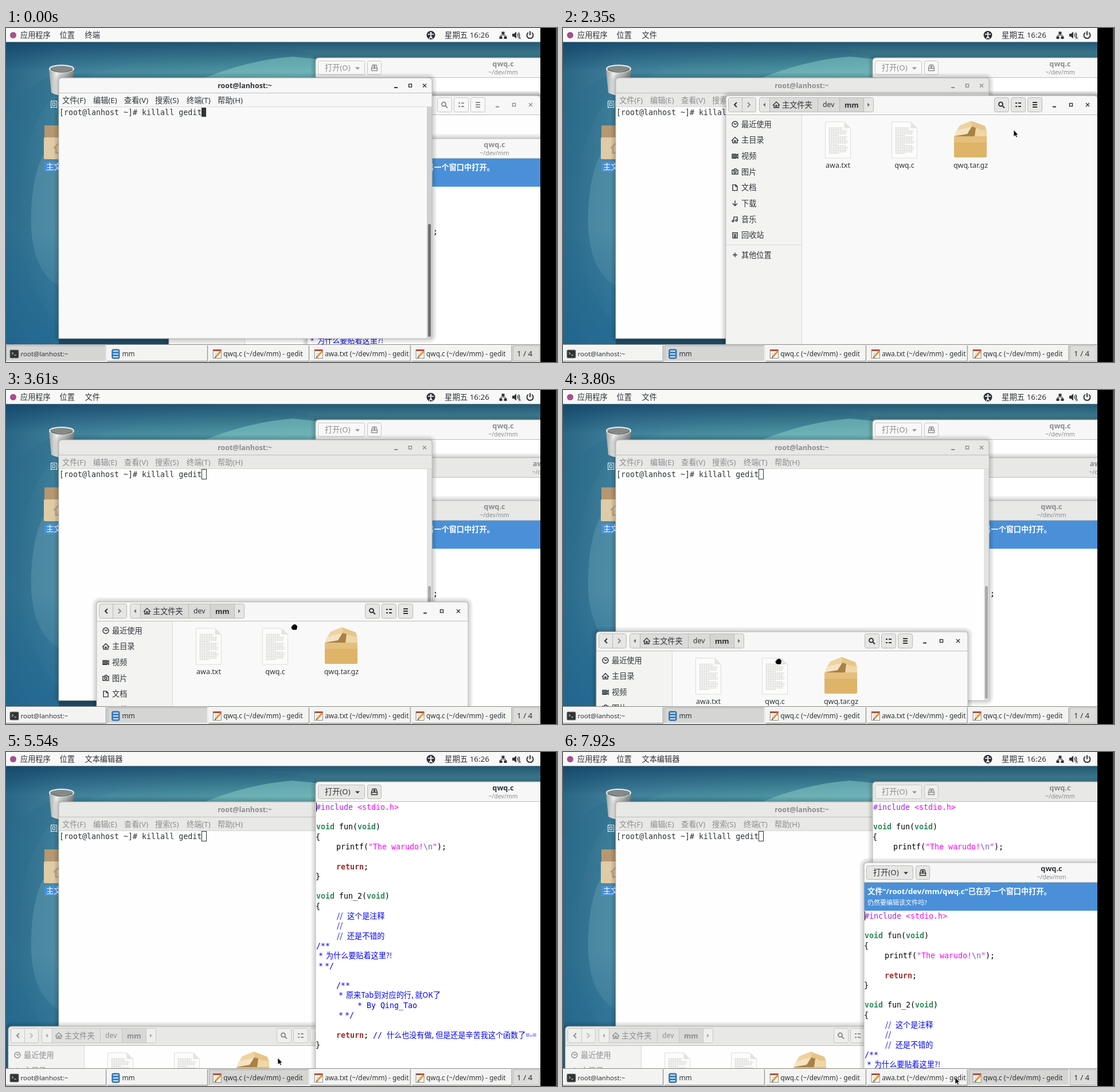
These frames come from a looping animation (961 px wide and 583 px high, 8 s). An HTML page:

```html
<!DOCTYPE html>
<html lang="zh-CN">
<head>
<meta charset="utf-8">
<title>Desktop session</title>
<style>
html, body { margin: 0; width: 100%; height: 100%; overflow: hidden; background: #000; }
svg { display: block; }
text { font-family: "Noto Sans", "Noto Sans CJK SC", "Noto Sans CJK", sans-serif; white-space: pre; }
.mono { font-family: "DejaVu Sans Mono", "Noto Sans CJK SC", monospace; }
.cjk { font-family: "Noto Sans CJK SC", "Noto Sans CJK JP", "Noto Sans CJK", sans-serif; }
.bold { font-weight: 700; }
.mid { text-anchor: middle; }
.line { fill: none; stroke: currentColor; stroke-width: 1.4; }
.win { --head: #e8e8e6; --ink: #8b8e8f; --btn: #efefed; --edge: #c6c6c3; --down: #d8d8d6; --thumb: #a8aaa8; --trough: #e3e3e1; --paper: #fefefe; color: var(--ink); }
.win.pale { --head: #f7f7f7; --btn: #f8f8f8; }
.win.on { --head: #f7f7f7; --ink: #2e3436; --btn: #e6e6e4; --edge: #b8b8b5; --down: #d4d4d1; --thumb: #6e7273; --trough: #d0d0ce; --paper: #f9f9f9; }
.head { fill: var(--head); }
.btn { fill: var(--btn); stroke: var(--edge); }
.ink { fill: var(--ink); }
.on .hollow, .win:not(.on) .solid { display: none; }
.task { --lit: #fff; --shade: #868683; fill: #f3f3f2; }
.task.on { --lit: #a4a4a1; --shade: #f4f4f3; fill: #d5d5d3; }
</style>
</head>
<body>
<script>
const rect = (x, y, w, h, attrs = '') => `<rect x="${x}" y="${y}" width="${w}" height="${h}" ${attrs}/>`;
const path = (d, attrs = 'class="line"') => `<path d="${d}" ${attrs}/>`;
const group = (x, y, body, attrs = '') => `<g transform="translate(${x} ${y})" ${attrs}>${body}</g>`;
const fill = c => `fill="${c}"`;
// y is the middle of the line
const text = (x, y, s, size = 13.2, attrs = 'class="ink"') =>
  `<text x="${x}" y="${y + size * .36}" font-size="${size}" ${attrs}>${s.replace(/</g, '&lt;')}</text>`;
const button = (x, y, w, h, body = '') => rect(x + .5, y + .5, w - 1, h - 1, 'rx="3" class="btn"') + body;

const controls = (xs, y) =>
  path(`M${xs[0] - 3} ${y + 3.5}h6`, 'class="line" style="stroke-width:2"') +
  rect(xs[1] - 2.5, y - 2.5, 5, 5, 'class="line"') +
  path(`M${xs[2] - 3} ${y - 3}l6 6m0-6l-6 6`);

function win(id, w, h, headH, body) {
  let shadow = '';
  for (let i = 1; i < 5; i++)
    shadow += rect(-2 * i, -2 * i, w + 4 * i, h + 4 * i, `rx="${6 + 2 * i}" fill="#000" opacity=".045"`);
  const top = `M0 ${headH}V6Q0 0 6 0H${w - 6}Q${w} 0 ${w} 6V${headH}`;
  return `<g id="${id}" class="win">${shadow}${rect(0, headH, w, h - headH, 'style="fill:var(--paper)"')}` +
    path(top + 'Z', 'class="head"') + path(top, 'fill="none" stroke="#b2b2af"') +
    body + path(`M0 ${headH - .5}H${w}M0 ${headH}V${h}H${w}V${headH}`, 'fill="none" stroke="#bdbdba"') + '</g>';
}

// terminal
const menus = [['文件(F)', 6], ['编辑(E)', 60], ['查看(V)', 114], ['搜索(S)', 168], ['终端(T)', 223], ['帮助(H)', 277]];
const terminal = win('term', 651, 455, 27,
  text(324.5, 13.5, 'root@lanhost:~', 12.4, 'class="ink bold mid"') + controls([588, 613, 638], 13.5) +
  rect(.5, 27, 650, 24, 'class="head"') + menus.map(([s, x]) => text(x, 39, s)).join('') +
  path('M0 50.5H651', 'stroke="#d6d6d3"') +
  text(1, 60, '[root@lanhost ~]# killall gedit', 13.3, 'class="mono" fill="#2e3436"') +
  rect(249, 52, 8, 16, 'class="solid" fill="#2e3436"') +
  rect(249.5, 51.5, 8, 17, 'class="hollow" fill="none" stroke="#2e3436"') +
  rect(642, 51, 9, 403, 'style="fill:var(--trough)"') + rect(644, 255, 5, 197, 'rx="2.5" style="fill:var(--thumb)"'));

// file manager
const house = 'M-6 1L0-5L6 1M-4 0V5H-1V1H1V5H4V0';
const places = [
  ['最近使用', 'M5 0A5 5 0 1 1-5 0A5 5 0 1 1 5 0M-2-2L0 0L3-1'], ['主目录', house],
  ['视频', 'M-5-3H2V4H-5ZM2 0L5-3V4L2 1M-4-1H1M-4 1H1M-4 3H1'],
  ['图片', 'M-5-3H-2L-1-5H2L3-3H5V4H-5ZM2 0A2 2 0 1 1-2 0A2 2 0 1 1 2 0'],
  ['文档', 'M-4-5H1L4-2V5H-4ZM1-5V-2H4'], ['下载', 'M0-5V4M-4 0L0 4L4 0'],
  ['音乐', 'M-2 3V-4H4V2M-2 3A1.5 1.5 0 1 1-5 3A1.5 1.5 0 1 1-2 3M4 2A1.5 1.5 0 1 1 1 2A1.5 1.5 0 1 1 4 2'],
  ['回收站', 'M-5-4H5M-4-4V5H4V-4M-2-1H2M-2 1H2M-2 3H2'], ['其他位置', 'M-4 0H4M0-4V4']];
let sheet = path('M0 0H33L44 11V63H0Z', 'fill="#fcfcfb" stroke="#dcdcda"') + path('M33 0V11H44Z', fill('#e3e3e0'));
for (let i = 0; i < 18; i++)
  sheet += path(`M6 ${10.5 + i * 2.6}h${i % 6 == 5 ? 17 : i < 2 ? 24 : 30 + i * 7 % 4}`, 'stroke="#c3c3c0" stroke-dasharray="3 .8"');
const box = path('M0 27H57V62Q57 64 55 64H2Q0 64 0 62Z', fill('#deb469')) + path('M0 27H57V38H0Z', fill('#e5bf7c')) +
  path('M2 27L8 15L29 9L50 15L55 27Z', fill('#a98046')) +
  path('M4 18L10 8L30 0L31 10Z', fill('#eed3a1')) + path('M30 0L54 9L57 18L31 10Z', fill('#e6c58a')) +
  path('M0 27L4 17L31 10L23 23Z', fill('#f5e3c3')) + path('M57 27L57 18L38 12L36 27Z', fill('#efd6a6'));
const arrow = (x, y, d) => path(`M${x - 2 * d} ${y - 4}L${x + 2 * d} ${y}L${x - 2 * d} ${y + 4}`, `class="line" style="stroke-width:2" opacity="${d < 0 ? 1 : .5}"`);
const caret = (x, d) => path(`M${x - 2 * d} 12.5l${4 * d} 3.5l${-4 * d} 3.5Z`, 'class="ink" opacity=".65"');
const files = win('files', 648, 470, 34,
  button(4, 3, 49, 26, path('M28.5 4V28', 'style="stroke:var(--edge)"')) + arrow(17, 16, -1) + arrow(40, 16, 1) +
  button(58, 3, 200, 26) + rect(76, 4, 122, 24, 'style="fill:var(--down)" opacity=".55"') +
  rect(198, 4, 42, 24, 'style="fill:var(--down)"') +
  path('M76.5 4V28M160.5 4V28M198.5 4V28M240.5 4V28', 'style="stroke:var(--edge)"') +
  caret(67, -1) + caret(249, 1) + group(88, 16, path(house)) +
  text(98, 16, '主文件夹') + text(169, 16, 'dev', 12.2) + text(207, 16, 'mm', 12.6, 'class="ink bold"') +
  button(468, 3, 26, 26) + button(497, 3, 26, 26) + button(526, 3, 26, 26) +
  path('M483 15A3.5 3.5 0 1 1 476 15A3.5 3.5 0 1 1 483 15M482 17.5L486 21.5', 'class="line" style="stroke-width:2"') +
  path('M505 13H508M510 13H515M505 19H508M510 19H515M535 12H543M535 16H543M535 20H543', 'class="line" style="stroke-width:2"') +
  controls([573, 602, 631], 16) +
  rect(.5, 34, 131.5, 436, fill('#f3f3f2')) + path('M132.5 34V470M0 260.5H132', 'stroke="#d9d9d6"') +
  places.map(([name, icon], i) => {
    const y = i < 8 ? 50 + i * 27.65 : 278;
    return group(16, y, path(icon)) + text(27, y, name);
  }).join('') +
  group(173.5, 46, sheet) + group(289.5, 46, sheet) + group(398, 44, box) +
  [['awa.txt', 195.5], ['qwq.c', 311.5], ['qwq.tar.gz', 427]]
    .map(([s, x]) => text(x, 121.5, s, 12.5, 'class="ink mid"')).join(''));

// text editor
const styles = {
  n: ['#000', 'mono'], p: ['#a020f0', 'mono'], s: ['#f0f', 'mono'], e: ['#6a5acd', 'mono'],
  k: ['#2e8b57', 'mono bold'], r: ['#a52a2a', 'mono bold'], c: ['#00f', 'mono'], j: ['#00f', 'cjk']
};
const source = [
  [0, 1, 'p', '#include'], [0, 73, 's', '<stdio.h>'],
  [2, 1, 'k', 'void'], [2, 41, 'n', 'fun('], [2, 73, 'k', 'void'], [2, 105, 'n', ')'], [3, 0, 'n', '{'],
  [4, 36, 'n', 'printf('], [4, 92, 's', '"The warudo!'], [4, 188, 'e', '\\n'], [4, 204, 's', '"'], [4, 212, 'n', ');'],
  [6, 36, 'r', 'return'], [6, 84, 'n', ';'], [7, 0, 'n', '}'],
  [9, 1, 'k', 'void'], [9, 41, 'n', 'fun_2('], [9, 89, 'k', 'void'], [9, 121, 'n', ')'], [10, 0, 'n', '{'],
  [11, 37, 'j', '//'], [11, 55, 'j', '这个是注释'], [12, 37, 'j', '//'], [13, 37, 'j', '//'], [13, 55, 'j', '还是不错的'],
  [14, 1, 'c', '/**'], [15, 5, 'c', '*'], [15, 18, 'j', '为什么要贴着这里?!'], [16, 5, 'c', '*'], [16, 16, 'c', '*/'],
  [18, 36, 'c', '/**'], [19, 40, 'c', '*'], [19, 53, 'j', '原来Tab到对应的行, 就OK了'],
  [20, 73, 'c', '*'], [20, 89, 'c', 'By Qing_Tao'], [21, 40, 'c', '*'], [21, 51, 'c', '*/'],
  [23, 36, 'r', 'return'], [23, 84, 'n', ';'], [23, 100, 'c', '//'],
  [23, 124, 'j', '什么也没有做, 但是还是辛苦我这个函数了=-='], [24, 0, 'n', '}']];
const listing = source.map(([row, x, kind, s]) => {
  const [color, cls] = styles[kind];
  return text(x, 44 + row * 17.3, s, kind == 'j' ? 13.1 : 13.3, `class="${cls}" fill="${color}"`);
}).join('');
const notice = rect(0, 35, 654, 49, fill('#4a90d9')) +
  text(6, 50.5, '文件“/root/dev/mm/qwq.c”已在另一个窗口中打开。', 13.2, 'class="bold" fill="#fff"') +
  text(6, 70, '仍然要编辑该文件吗?', 11, fill('#fff'));
const editor = (id, title, info, lines) => win(id, 654, 520, 35,
  rect(0, 35, 654, 485, fill('#fff')) +
  button(4, 5, 82, 25) + text(16, 17.5, '打开(O)') + path('M69 16.5h8l-4 4Z', 'class="ink"') +
  button(90, 5, 25, 25) + path('M97.5 22.5V18L99.5 12.5H105.5L107.5 18V22.5ZM97 18.5H108M102.5 13V17M100.5 15L102.5 17L104.5 15') +
  text(327, 10.5, title, 12.8, 'class="ink bold mid"') + text(327, 25.5, '~/dev/mm', 10.6, 'class="mid" fill="#8b8e8f"') +
  info + group(0, info ? 49 : 0, lines + rect(1, 36, 1, 16, 'class="caret" fill="#000"')));

// desktop
const stops = list => list.map(([at, c, a = 1]) => `<stop offset="${at}" stop-color="${c}" stop-opacity="${a}"/>`).join('');
const desktop = `<defs>
  <linearGradient id="sea">${stops([[0, '#2d6a89'], [.1, '#4486a0'], [.35, '#559ba8'], [.56, '#66b0b3']])}</linearGradient>
  <linearGradient id="dusk" x2="0" y2="1">${stops([[.04, '#0f4064', .8], [.13, '#0f4064', .1], [.6, '#1c6390', .1], [1, '#1c6390', .8]])}</linearGradient>
  <linearGradient id="steel">${stops([[0, '#9fa3a2'], [.3, '#eceeed'], [.65, '#bcc0bf'], [1, '#7a7e7d']])}</linearGradient></defs>` +
  rect(0, 0, 961, 583, fill('url(#sea)')) +
  path('M0 150Q45 90 92 80V110Q30 170 22 300T92 520V552H60Q0 440 0 330Z', fill('#2f708f') + ' opacity=".4"') +
  path('M92 190Q48 220 44 320T92 450Z', fill('#6aa3b3') + ' opacity=".45"') +
  path('M130 90Q260 40 400 34Q500 36 541 45V90Z', fill('#4d98a6') + ' opacity=".5"') +
  rect(0, 0, 961, 583, fill('url(#dusk)')) +
  path('M340 90Q420 56 500 50L541 54V90Z', fill('#84c8c5') + ' opacity=".55"') +
  path('M92 535H284V553H92Z', fill('#1d4a68')) +
  path('M75 71L79 113Q97 122 115 113L119 71Z', fill('url(#steel)')) +
  '<ellipse cx="97" cy="71" rx="21" ry="6" fill="#858988" stroke="#eceeed" stroke-width="2"/>' +
  path('M78 73Q97 81 116 73', 'fill="none" stroke="#5f6362" stroke-width="1.5"') +
  text(77, 133, '回收站', 13.2, fill('#fff')) +
  path('M67 170H92L98 178H124V228H67Z', fill('#b5986f')) + rect(66, 191, 60, 38, 'rx="2" fill="#e0cba8"') +
  path('M83 210L96 198L109 210M87 208V218H105V208', 'fill="none" stroke="#bfa57c" stroke-width="3"') +
  rect(67, 234, 58, 17, fill('#4a90d9')) + text(70, 242.5, '主文件夹', 13.2, fill('#fff'));

// panels
const dark = '#2e3436';
const topBar = rect(0, 0, 932, 24.5, fill('#f8f8f7')) + rect(0, 24, 932, 1, fill('#8d9293')) +
  '<circle cx="12.5" cy="12.5" r="5.5" fill="#a3508f"/>' +
  text(25, 12, '应用程序', 13.2, fill(dark)) + text(93.5, 12, '位置', 13.2, fill(dark)) +
  text(137.5, 12, '', 13.2, `id="app" fill="${dark}"`) +
  text(765, 12, '星期五 16:26', 13.4, `fill="${dark}" font-weight="500"`) +
  group(741, 12.5, `<circle r="7.5" fill="${dark}"/><circle cy="-4" r="1.5" fill="#fff"/>` +
    path('M-5-1.5H5M0-1V2L-2.5 6M0 2L2.5 6', 'fill="none" stroke="#fff" stroke-width="1.6"')) +
  group(867, 12.5, path('M-2.5-6H2.5V-1.5H-2.5ZM-6.5 2H-1.5V6.5H-6.5ZM1.5 2H6.5V6.5H1.5Z', fill(dark)) +
    path('M0-2V0M-4 2V0H4V2', `fill="none" stroke="${dark}"`)) +
  group(890, 12.5, path('M-7-2.5H-4L0-6V6L-4 2.5H-7Z', fill(dark)) +
    path('M2-2.5Q4 0 2 2.5M4-4.5Q7.5 0 4 4.5', `fill="none" stroke="${dark}" stroke-width="1.5"`) + path('M4 3l4 4m0-4l-4 4', `stroke="${dark}"`)) +
  group(914, 12.5, path('M-3-4.5A5.5 5.5 0 1 0 3-4.5M0-7V0', `fill="none" stroke="${dark}" stroke-width="2"`));

const icons = {
  term: rect(0, 0, 15, 14, 'rx="1.5" fill="#2f3334" stroke="#777"') + path('M3 4l3 2l-3 2M7 9h4', 'fill="none" stroke="#ddd"'),
  files: rect(1, -1, 13, 16, 'rx="2" fill="#3c7fc0" stroke="#235e96"') + path('M3 2H12M3 7H12M3 12H12', 'stroke="#cfe2f4" stroke-width="2"'),
  note: rect(.5, -.5, 14, 15, 'fill="#fbfbfa" stroke="#888"') + rect(.5, -1, 14, 3, fill('#b54c3b')) +
    path('M3 6H11M3 9H9', 'stroke="#bbb"') + path('M5 12L14 2', 'stroke="#e8932f" stroke-width="3"') + path('M3 14l1-3l2 2Z', fill('#444'))
};
const tasks = [['term', 'root@lanhost:~', 11.5], ['files', 'mm', 12], ['src', 'qwq.c (~/dev/mm) - gedit'], ['awa', 'awa.txt (~/dev/mm) - gedit'], ['copy', 'qwq.c (~/dev/mm) - gedit']];
const taskBar = rect(0, 552, 932, 31, fill('#e9e9e7')) + rect(0, 552, 932, 1, fill('#8f8f8c')) +
  tasks.map(([id, label, size = 11.8], i) => group(i * 176.9, 554,
    rect(0, 0, 175, 28) + path('M.5 28V.5H175', 'fill="none" style="stroke:var(--lit)"') +
    path('M0 27.5H174.5V0', 'fill="none" style="stroke:var(--shade)"') +
    group(7, 8, icons[id] || icons.note) + text(25.5, 14.5, label, size, fill(dark)),
    `class="task" data-id="${id}"`)).join('') +
  rect(884.5, 554.5, 46, 27, 'fill="#dcdcda" stroke="#b4b4b1"') + text(891, 568, '1 / 4', 13.4, fill(dark));

const pointers = '<g id="pointer">' +
  path('M0 0V11.5L2.6 9.2L4.6 13L6.4 12L4.6 8.4H8Z', 'id="arrow" fill="#000" stroke="#fff" stroke-width=".7"') +
  path('M-3-6.5H-1L0-5.5L1-6.5H3M0-5.5V5.5M-3 6.5H-1L0 5.5L1 6.5H3', 'id="beam" fill="none" stroke="#222" stroke-width="1.2"') +
  path('M-4-2Q-4-5-2-4Q-1-6 1-5Q3-6 4-3Q6-3 5 1L4 5H-3Q-6 2-6 0Q-5-2-4-2Z', 'id="hand" fill="#000" stroke="#fff" stroke-width=".7"') + '</g>';

document.body.innerHTML = `<svg width="961" height="583" viewBox="0 0 961 583">${desktop}
  <g id="windows">${editor('src', 'qwq.c', '', listing)}${editor('awa', 'awa.txt', '', '')}${files}${editor('copy', 'qwq.c', notice, listing)}${terminal}</g>
  ${topBar}${taskBar}${pointers}${rect(932, 0, 29, 583, fill('#000'))}${rect(959, 0, 2, 583, fill('#555'))}</svg>`;

// timeline
const $ = id => document.getElementById(id);
const LOOP = 8000;
const stack = ['src', 'awa', 'files', 'copy', 'term'];
const raises = [[2150, 'files'], [4880, 'awa'], [5450, 'src'], [7700, 'copy']];
const homes = { src: [540, 52], awa: [616, 117.5], copy: [525, 193], term: [92, 87] };
const drag = [[3090, 284, 118], [3370, 284, 304], [3800, 59, 421], [3890, 4, 479]];
const moves = [[280, 533, 552], [480, 775, 200], [610, 803, 164], [750, 803, 185], [800, 778, 163], [1220, 778, 163], [1270, 778, 178],
  [1600, 778, 178], [1690, 786, 178], [2350, 786, 178], [2920, 650, 140], [3090, 650, 140], [3370, 666, 337],
  [3800, 376, 474], [3890, 370, 501], [3950, 370, 501], [4300, 830, 300], [4480, 857, 200], [4650, 805, 164],
  [5120, 805, 164], [5400, 440, 566], [5480, 440, 566], [5770, 600, 415], [6150, 600, 415], [6430, 787, 64],
  [6760, 787, 90], [7500, 800, 568], [7680, 800, 568], [7920, 684, 568]];
const shapes = [[0, ''], [280, 'arrow'], [3090, 'hand'], [3920, 'arrow'], [4480, 'beam'], [5200, 'arrow'],
  [5650, 'beam'], [6400, 'arrow'], [6430, ''], [6760, 'beam'], [7480, 'arrow']];

function along(points, t) {
  const i = points.findIndex(p => p[0] > t);
  if (i == 0) return points[0].slice(1);
  if (i < 0) return points.at(-1).slice(1);
  const [a, b] = [points[i - 1], points[i]], k = (t - a[0]) / (b[0] - a[0]);
  return [a[1] + (b[1] - a[1]) * k, a[2] + (b[2] - a[2]) * k];
}
const place = (el, [x, y]) => el.setAttribute('transform', `translate(${Math.round(x)} ${Math.round(y)})`);
for (const id in homes) place($(id), homes[id]);

let shown;
function arrange(t) {
  const raised = raises.filter(r => r[0] <= t).map(r => r[1]);
  if (shown === raised.length) return;
  shown = raised.length;
  const order = [...stack];
  for (const id of raised) order.push(...order.splice(order.indexOf(id), 1));
  const active = order.at(-1);
  for (const id of order) {
    const el = $(id);
    $('windows').append(el);
    el.classList.toggle('on', id == active);
    el.classList.toggle('pale', !raised.length || id == 'src' && !raised.includes('src'));
  }
  for (const el of document.querySelectorAll('.task')) el.classList.toggle('on', el.dataset.id == active);
  $('app').textContent = { term: '终端', files: '文件' }[active] || '文本编辑器';
}

function frame(now) {
  const t = now % LOOP;
  arrange(t);
  place($('files'), along(drag, t));
  place($('pointer'), along(moves, t));
  const shape = shapes.findLast(s => s[0] <= t)[1];
  for (const id of ['arrow', 'beam', 'hand']) $(id).style.display = id == shape ? '' : 'none';
  const lit = t > 4880 && (t - 4800) % 1200 >= 400 || t > 7700;
  for (const el of document.querySelectorAll('.caret'))
    el.style.display = lit && el.closest('.win.on') ? '' : 'none';
  requestAnimationFrame(frame);
}
frame(0);
</script>
</body>
</html>
```
